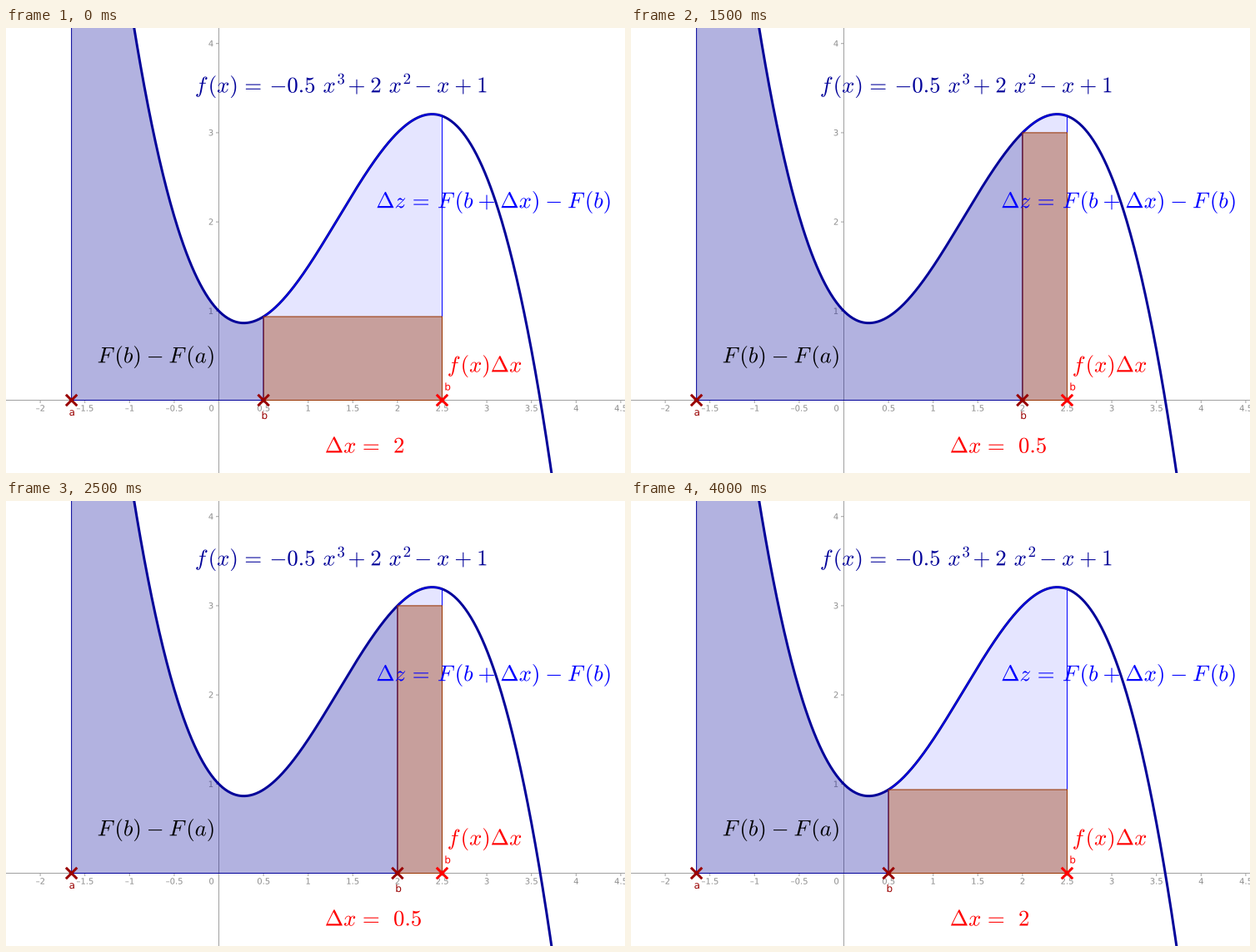
Recreate the animation shown at these times as a matplotlib script. Size 743x535 px, loop 4500 ms.

```python
import numpy as np
import matplotlib.pyplot as plt
from matplotlib.animation import FuncAnimation
from matplotlib.patches import PathPatch, Polygon
from matplotlib.textpath import TextPath

W, H, DPI = 743, 535, 100
PX = 72 / DPI                      # one pixel in points
X0, Y0, UNIT = 255.5, 87.5, 107.2  # origin and scale, y upwards
A, END = -1.65, 2.5
NAVY, BLUE, BROWN = "#000099", "#0000ff", "#993300"
MAROON, RED, GRAY = "#990000", "#ff0000", "#8e8e8e"
MATH = 26.8

plt.rcParams["mathtext.fontset"] = "cm"

fig = plt.figure(figsize=(W / DPI, H / DPI), dpi=DPI, facecolor="white")
ax = fig.add_axes([0, 0, 1, 1])
ax.set(xlim=(0, W), ylim=(0, H))
ax.axis("off")


def f(x):
    return -0.5 * x**3 + 2 * x**2 - x + 1


def px(x):
    return X0 + UNIT * x


def py(y):
    return Y0 + UNIT * y


def tex(s):
    """Widen mathtext gaps to TeX spacing; '~' stands for a unary minus."""
    gaps = (("f", 0, .12), ("F", 0, .15), ("z", 0, .05), ("+", .053, .053),
            ("-", .053, .053), ("=", .117, .2), ("\\ ", 0, .046))
    for sym, before, after in gaps:
        left = f"\\hspace{{{before}}}" if before else ""
        s = s.replace(sym, f"{left}{sym}\\hspace{{{after}}}")
    return "$" + s.replace("~", "{-}") + "$"


def text_path(x, top, s, size):
    return TextPath((x, H - top), s, size=size, prop={"family": "DejaVu Sans"})


def put(path, color, z):
    return ax.add_patch(PathPatch(path, fc=color, lw=0, zorder=z))


def formula(x, top, s, color):
    return put(text_path(x, top, tex(s), MATH), color, 6)


def tick_label(cx, top, value):
    s = f"{value:g}".replace("-", "\u2013")
    box = text_path(0, 0, s, 10).get_extents()
    put(text_path(cx - (box.x0 + box.x1) / 2, top, s, 10), GRAY, 1)


def line(xs, ys, color, width, z):
    return ax.plot(xs, ys, color=color, lw=width * PX, zorder=z, snap=False,
                   solid_capstyle="butt")[0]


def region(color, alpha, z):
    return ax.add_patch(Polygon([(0, 0), (1, 0), (1, 1)], fc=(color, alpha),
                                ec=color, lw=PX, zorder=z, snap=False))


def cross_points(x, r=6.7):
    xs = px(x) + r * np.array([-1, 1, np.nan, -1, 1])
    ys = Y0 + r * np.array([-1, 1, np.nan, 1, -1])
    return xs, ys


def cross(x, color, z):
    return line(*cross_points(x), color, 3, z)


def under_curve(lo, hi):
    x = np.linspace(lo, hi, 160)
    x = np.concatenate(([lo], x, [hi]))
    y = f(x)
    y[[0, -1]] = 0
    return np.column_stack((px(x), py(y)))


# axes
line([0, W], [Y0, Y0], "#a0a0a0", 1, 0)
line([X0, X0], [0, H], "#a0a0a0", 1, 0)
for k in range(-4, 10):
    x = px(k / 2)
    if k:
        line([x, x], [Y0 - 3.5, Y0], "#a0a0a0", 1, 0)
        tick_label(x, 460.6, k / 2)
tick_label(246.6, 460.6, 0)
for k in range(1, 5):
    line([X0 - 3.5, X0], [py(k), py(k)], "#a0a0a0", 1, 0)
    tick_label(246, H - py(k) + 3.5, k)

# curve and areas
xs = np.linspace(-1.2, 4, 500)
line(px(xs), py(f(xs)), NAVY, 3, 2)
area = region(NAVY, 0.3, 3)
rest = region(BLUE, 0.1, 3.1)
slab = region(BROWN, 0.39, 3.2)

# points
cross(A, MAROON, 5)
b_mark = cross(0, MAROON, 5)
cross(END, RED, 5.1)
put(text_path(75.6, 466, "a", 12), MAROON, 5)
put(text_path(526.3, 435.5, "b", 12), RED, 5)
b_label = put(text_path(0, 470, "b", 12), MAROON, 5)

# formulas
formula(226.8, 77.4, r"f(x)=~0.5\ x^3", NAVY)
formula(404.6, 77.4, r"+2\ x^2", NAVY)
formula(484.4, 77.4, r"-x+1", NAVY)
formula(444.3, 216.2, r"\Delta z=F(b+\Delta x)-F(b)", BLUE)
formula(109.7, 402.3, r"F(b)-F(a)", "black")
formula(529.7, 413.4, r"f(x)\Delta x", RED)
formula(382.8, 510.6, r"\Delta x=", RED)
value = formula(465, 510.6, "0", RED)


def update(i):
    dx = abs(4 - i) * 0.5
    b = END - dx
    area.set_xy(under_curve(A, b))
    rest.set_xy(under_curve(b, END))
    left, right, top = px(b), px(END), py(f(b))
    slab.set_xy([(left, Y0), (left, top), (right, top), (right, Y0)])
    b_mark.set_data(*cross_points(b))
    b_label.set_path(text_path(left - 2.6, 470, "b", 12))
    value.set_path(text_path(465, 510.6, tex(f"{dx:g}"), MATH))
    return area, rest, slab, b_mark, b_label, value


anim = FuncAnimation(fig, update, frames=9, interval=500, repeat=True,
                     repeat_delay=0, init_func=lambda: update(0), blit=False)
plt.show()
```
